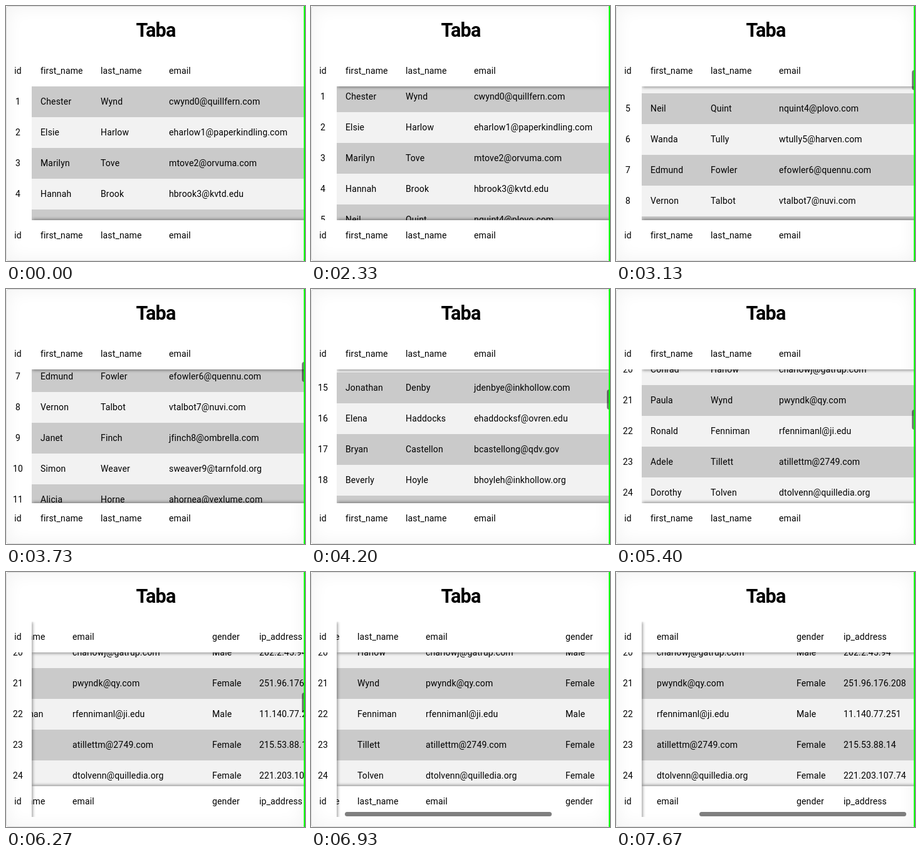
Animation, 477 px wide and 406 px high, one loop 8000 ms. Source, as an HTML page:

```html
<!DOCTYPE html>
<html lang="en">
<head>
<meta charset="utf-8">
<title>Taba</title>
<style>
  html, body { margin: 0; width: 100%; height: 100%; overflow: hidden; background: #fff; }
  #stage { position: relative; width: 477px; height: 406px; overflow: hidden; color: #000;
    font: 14px/49px Roboto, "Liberation Sans", sans-serif; letter-spacing: .15px; }
  #stage div, span, h1 { position: absolute; }
  span { width: max-content; }
  #page { inset: 0 1px 0 0; box-sizing: border-box; border: 1px solid #dcdcdc; border-radius: 4px;
    box-shadow: inset 0 0 26px 3px #f4f4f4; }
  h1 { left: 0; width: 478px; top: 19px; margin: 0; text-align: center;
    font-size: 30.5px; line-height: 40px; font-weight: 700; letter-spacing: -.8px; }
  .clip { overflow: hidden; }
  #view { left: 41px; top: 79px; width: 434px; height: 311px; }
  #body { left: 0; top: 49px; width: 434px; height: 213px; }
  #ids { left: 0; top: 128px; width: 41px; height: 213px; }
  .id { width: 38px; text-align: center; }
  .row { left: 0; width: 640px; height: 49px; }
  .shade { box-shadow: 0 0 4px 2px rgba(0, 0, 0, .34); }
  #over, #under { left: 3px; width: 460px; height: 10px; }
  #over { top: -10px; }
  #under { top: 213px; }
  #side { left: -10px; top: 3px; width: 10px; height: 320px; }
  .thumb { background: rgba(0, 0, 0, .5); border-radius: 4px; }
  #vbar { left: 472px; width: 8px; height: 32px; }
  #hbar { top: 382px; width: 330px; height: 7px; }
  #edge { left: 475px; top: 0; width: 2px; height: 406px; background: #0f0; }
</style>
</head>
<body>
<div id="stage">
  <div id="page"></div>
  <h1>Taba</h1>
  <div id="ids" class="clip"><div id="idList"></div></div>
  <div id="view" class="clip">
    <div id="head" class="row"></div>
    <div id="body" class="clip">
      <div id="rows"></div>
      <div id="over" class="shade"></div>
      <div id="under" class="shade"></div>
    </div>
    <div id="foot" class="row" style="top:262px"></div>
    <div id="side" class="shade"></div>
  </div>
  <div id="vbar" class="thumb"></div>
  <div id="hbar" class="thumb"></div>
  <div id="edge"></div>
</div>
<script>
const LOOP = 8000, STEP = 1000 / 15, ROW = 49;
const columns = [14, 110, 219, 442, 517];
const people = `Chester Wynd quillfern.com
Elsie Harlow paperkindling.com
Marilyn Tove orvuma.com
Hannah Brook kvtd.edu
Neil Quint plovo.com
Wanda Tully harven.com
Edmund Fowler quennu.com
Vernon Talbot nuvi.com
Janet Finch ombrella.com
Simon Weaver tarnfold.org
Alicia Horne vexlume.com
Martin Pryor sundrift.net
Teresa Colby ploverly.com
Roger Sutton dunmark.com
Jonathan Denby inkhollow.com
Elena Haddocks ovren.edu
Bryan Castellon qdv.gov
Beverly Hoyle inkhollow.org
Norman Pike gearvellica.com
Conrad Harlow gatrup.com Male 202.2.45.94
Paula Wynd qy.com Female 251.96.176.208
Ronald Fenniman ji.edu Male 11.140.77.251
Adele Tillett 2749.com Female 215.53.88.14
Dorothy Tolven quilledia.org Female 221.203.107.74`.split('\n').map(line => line.split(' '));

const el = id => document.getElementById(id);
const cells = list => list.map((text, i) => `<span style="left:${columns[i]}px">${text}</span>`).join('');
const show = (node, on) => { node.style.display = on ? '' : 'none'; };

const titles = ['first_name', 'last_name', 'email', 'gender', 'ip_address'];
for (const id of ['head', 'foot']) {
  el(id).innerHTML = cells(titles);
  el('stage').insertAdjacentHTML('beforeend',
    `<div class="id" style="top:${id === 'head' ? 79 : 341}px">id</div>`);
}
people.forEach(([first, last, domain, ...rest], i) => {
  const email = (first[0] + last).toLowerCase() + i.toString(36) + '@' + domain;
  const top = `top:${i * ROW}px`;
  el('rows').insertAdjacentHTML('beforeend',
    `<div class="row" style="${top};background:${i % 2 ? '#f2f2f2' : '#cacaca'}">${cells([first, last, email, ...rest])}</div>`);
  el('idList').insertAdjacentHTML('beforeend', `<div class="id" style="${top}">${i + 1}</div>`);
});

// Scroll offsets as [time, px]
const yKeys = [[0, 0], [2000, 0], [2333, 8], [2833, 90], [3133, 185], [3533, 261], [3600, 262],
  [4200, 681], [4800, 863], [5333, 954], [5400, 955], [LOOP, 955]];
const xKeys = [[0, 0], [5733, 0], [6267, 154], [6533, 195], [6667, 195], [7133, 0], [7200, 0],
  [7667, 195], [LOOP, 195]];

// Monotone cubic through the keys
function sample(keys, t) {
  const slope = i => i < 0 || i > keys.length - 2 ? 0
    : (keys[i + 1][1] - keys[i][1]) / (keys[i + 1][0] - keys[i][0]);
  const tangent = i => {
    const a = slope(i - 1), b = slope(i);
    return a * b > 0 ? 2 * a * b / (a + b) : 0;
  };
  let i = 0;
  while (i < keys.length - 2 && t >= keys[i + 1][0]) i++;
  const [t0, v0] = keys[i], [t1, v1] = keys[i + 1];
  const d = t1 - t0, u = (t - t0) / d, w = 1 - u;
  return v0 * w * w * (1 + 2 * u) + v1 * u * u * (3 - 2 * u)
    + d * u * w * (tangent(i) * w - tangent(i + 1) * u);
}

function draw(now) {
  const t = Math.floor((now % LOOP + 4) / STEP) * STEP;
  const x = Math.round(sample(xKeys, t)), y = Math.round(sample(yKeys, t));
  el('rows').style.transform = `translate(${-x}px,${-y}px)`;
  el('idList').style.transform = `translateY(${-y}px)`;
  el('head').style.left = el('foot').style.left = -x + 'px';
  show(el('over'), y > 0);
  show(el('side'), x > 0);
  show(el('vbar'), t > 2390 && t < 6700);
  show(el('hbar'), t > 6700);
  el('vbar').style.top = Math.round(80.4 + y * .117) + 'px';
  el('hbar').style.left = Math.round(3 + x * 2 / 3) + 'px';
  requestAnimationFrame(() => draw(performance.now() - start));
}
const start = performance.now();
draw(0);
</script>
</body>
</html>
```
